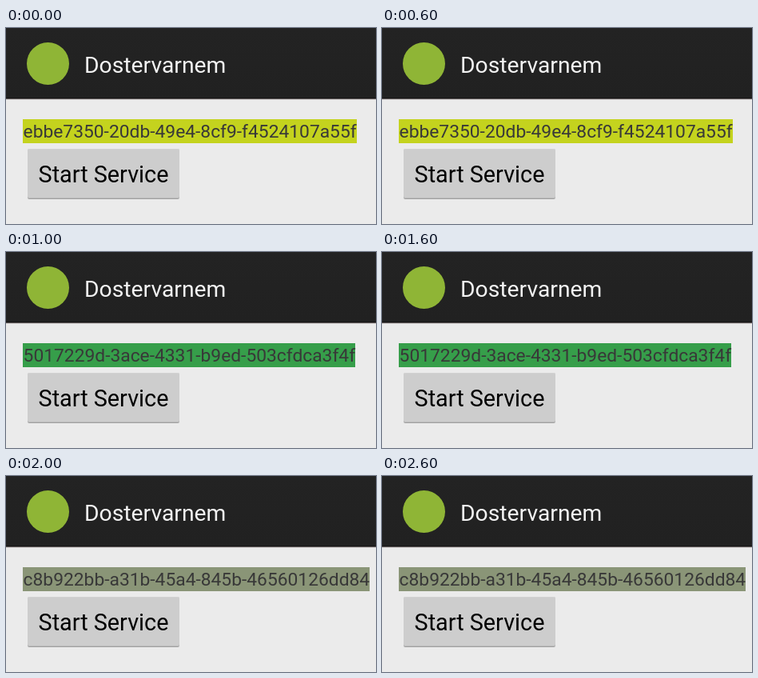
Recreate the animation shown at these times as an HTML page. Size 463x245 px, loop 3 s.

```html
<!DOCTYPE html>
<html lang="en">
<head>
<meta charset="utf-8">
<title>Service demo</title>
<style>
  html, body { margin: 0; width: 100%; height: 100%; overflow: hidden; }
  body { position: relative; background: #ebebeb; font-family: Roboto, sans-serif; white-space: nowrap; }
  body > * { position: absolute; box-sizing: border-box; }

  .bar {
    left: 0; top: 0; width: 100%; height: 89px;
    background: linear-gradient(#232323, #212121);
    border-bottom: 1px solid #5c5555;
    box-shadow: inset 0 -1px #161616, 0 1px #d2d0d0;
  }
  .icon { left: 26px; top: 18px; width: 53px; height: 53px; border-radius: 50%; background: #8fb536; }
  .title { left: 98px; top: 30px; font-size: 28.3px; line-height: 34px; color: #f3f3f3; }

  .id {
    left: 21px; top: 114px; height: 30px;
    padding: 1px 0 0 .6px;
    font-size: 22.8px; line-height: 30px; color: #383838;
    background: var(--bg);
    opacity: 0;
    animation: show 3s var(--delay) step-end infinite;
  }
  @keyframes show {
    0% { opacity: 1; }
    33.3333%, 100% { opacity: 0; }
  }

  .button {
    left: 27px; top: 151px; width: 190px; height: 62px;
    padding-top: 1px;
    font-size: 28.8px; line-height: 62px; text-align: center; color: #000;
    background: #cdcdcd;
    border-radius: 2px;
    box-shadow: inset 0 1px #d2d2d2, inset 0 -1px #bababa, 0 1px #a2a2a2;
  }
</style>
</head>
<body>
  <div class="bar"></div>
  <div class="icon"></div>
  <div class="title">Dostervarnem</div>
  <div class="id" style="--bg: #c4d31e; --delay: 0s">ebbe7350-20db-49e4-8cf9-f4524107a55f</div>
  <div class="id" style="--bg: #369e4a; --delay: -2s">5017229d-3ace-4331-b9ed-503cfdca3f4f</div>
  <div class="id" style="--bg: #8a9577; --delay: -1s">c8b922bb-a31b-45a4-845b-46560126dd84</div>
  <div class="button">Start Service</div>
</body>
</html>
```
